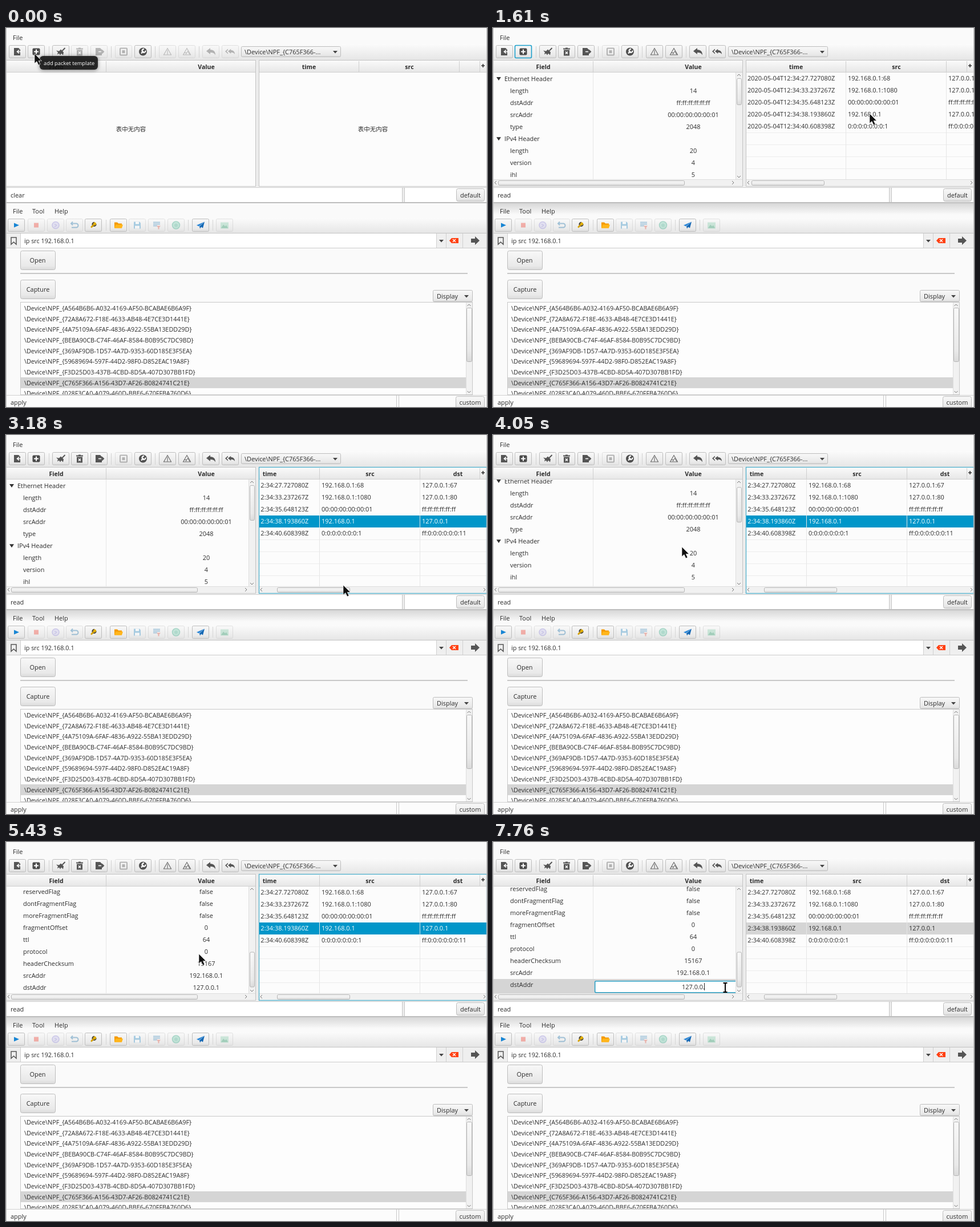
An HTML page for the animation above (8000 ms loop, 843 by 664 pixels).

```html
<!DOCTYPE html>
<html lang="en">
<head>
<meta charset="utf-8">
<title>Packet editor</title>
<style>
html, body { margin: 0; width: 100%; height: 100%; overflow: hidden; background: #fafafa; }
svg { display: block; width: 843px; height: 664px; }
text { font: 10.95px "Open Sans", "Noto Sans CJK SC", "Noto Sans CJK", sans-serif; fill: #2c2c2c; white-space: pre; }
.b { font-weight: 700; font-size: 10.6px; }
.m { text-anchor: middle; }
.dev, .edit { font-size: 10.82px; }
.empty { font-size: 10.5px; }
.btn { fill: url(#btn); stroke: #bdbdbd; }
.off { opacity: .4; }
.thumb { fill: url(#btn); stroke: #b4b4b4; }
.arrow { fill: none; stroke: #777; }
.focus { fill: none; stroke: #4fb0cc; stroke-width: 1.3; }
.ico { fill: #555; }
.line { fill: none; stroke: #fff; stroke-width: 1.6; }
</style>
</head>
<body>
<svg id="stage" viewBox="0 0 843 664"></svg>
<script>
const LOOP = 8000, ROW = 21.05;
const BLUE = '#0096c9', GREY = '#d5d5d5';

const rect = (x, y, w, h, fill, more = '') =>
  `<rect x="${x}" y="${y}" width="${w}" height="${h}" fill="${fill}" ${more}/>`;
const box = (x, y, w, h, cls, more = '') =>
  `<rect x="${x + .5}" y="${y + .5}" width="${w - 1}" height="${h - 1}" class="${cls}" ${more}/>`;
const text = (x, y, s, cls = '', more = '') =>
  `<text x="${x}" y="${y + 4}" class="${cls}" ${more}>${s}</text>`;
const path = (d, more = '') => `<path d="${d}" ${more}/>`;
const hline = (x, y, w, c) => rect(x, y, w, 1, c);
const vline = (x, y, h, c, more) => rect(x, y, 1, h, c, more);
const group = (id, body, more = '') => `<g id="${id}" ${more}>${body}</g>`;
const clip = (id, x, y, w, h) =>
  `<clipPath id="${id}">${rect(x, y, w, h, '#000')}</clipPath>`;
const grad = (id, ...stops) => `<linearGradient id="${id}" x2="0" y2="1">` +
  stops.map(([at, c, a = 1]) => `<stop offset="${at}" stop-color="${c}" stop-opacity="${a}"/>`).join('') + '</linearGradient>';
const drop = (x, y) => path(`M${x - 4} ${y - 2}h8l-4 4.5z`, 'fill="#444"');
const chevron = (x, y, dir) => path({
  l: `M${x + 2} ${y - 3}l-3 3l3 3`, r: `M${x - 2} ${y - 3}l3 3l-3 3`,
  u: `M${x - 3} ${y + 2}l3-3l3 3`, d: `M${x - 3} ${y - 2}l3 3l3-3`
}[dir], 'class="arrow"');
const tool = (x, y, icon, cls = '') =>
  `<g class="${cls}">${box(x, y, 30, 23, 'btn', 'rx="2"')}` +
  `<g class="ico" transform="translate(${x + 15} ${y + 11.5})">${icon}</g></g>`;

const wrench = c => path('M-3 3L1-1M4.5-2A3 3 0 1 1 2-4.5', `fill="none" stroke="${c}" stroke-width="2.2"`);
const sheet = path('M-6-6.5H2L5-3.5V6.5H-6Z');
const reply = 'M-8-1L-1-6.5V-3.5C5-3.5 8 0 8 6C6 2.5 4 1.5-1 1.5V4.5Z';
const prism = path('M0-6L6.500 5.500H-6.500Z', 'fill="none" stroke="#666" stroke-width="1.1"');
const icons = {
  load: sheet + path('M7 0H0M3-3L-.5 0L3 3', 'class="line"'),
  add: rect(-6.5, -6, 13, 12, '#4a4a4a', 'rx="2"') + path('M-4 0H4M0-4V4', 'class="line" style="stroke-width:2"'),
  broom: path('M7.5-6.5L1 0', 'stroke="#555" stroke-width="2"') +
    path('M-8-2L-3-1L0-4L5 1L4 6L1 3L-1 6L-3 3L-6 5L-5 1Z'),
  trash: path('M-6-6H-2V-7H2V-6H6V-4H-6ZM-5-3H5V7H-5Z') + path('M-2 0L2 4M2 0L-2 4', 'class="line"'),
  send: sheet + path('M-1 0H8M5-3L8 0L5 3', 'fill="none" stroke="#555" stroke-width="2"') + path('M-1 0H4', 'class="line"'),
  stop: rect(-6, -6, 12, 12, 'none', 'rx="1" stroke="#555" stroke-width="2"') + rect(-2.5, -2.5, 5, 5, '#555'),
  fix: '<circle r="7" fill="#505050"/>' + wrench('#fff'),
  tri: prism + path('M0-3V5', 'stroke="#666" stroke-width="1.1"'),
  tris: prism + path('M-2 5L1.5-1L5 5M-4 2H0', 'fill="none" stroke="#666"'),
  undo: path(reply),
  undoAll: path(reply, 'transform="translate(2 0) scale(.75)"') + path('M-4-5L-9-.5L-4 4V2L-6.5-.5L-4-3Z')
};

// Seconds, source and destination of each captured packet
const packets = [
  ['27.727080', '192.168.0.1:68', '127.0.0.1:67'],
  ['33.237267', '192.168.0.1:1080', '127.0.0.1:80'],
  ['35.648123', '00:00:00:00:00:01', 'ff:ff:ff:ff:ff:ff'],
  ['38.193860', '192.168.0.1', '127.0.0.1'],
  ['40.608398', '0:0:0:0:0:0:0:1', 'ff:0:0:0:0:0:0:11']
];
const fields = `Ethernet Header
length=14
dstAddr=ff:ff:ff:ff:ff:ff
srcAddr=00:00:00:00:00:01
type=2048
IPv4 Header
length=20
version=4
ihl=5
tos=0
totalLength=20
identification=0
reservedFlag=false
dontFragmentFlag=false
moreFragmentFlag=false
fragmentOffset=0
ttl=64
protocol=0
headerChecksum=15167
srcAddr=192.168.0.1
dstAddr=127.0.0.1`.split('\n').map(s => s.split('='));
const devices = `A564B6B6-A032-4169-AF50-BCABAE6B6A9F
72A8A672-F18E-4633-AB48-4E7CE3D1441E
4A75109A-6FAF-4836-A922-55BA13EDD29D
BEBA90CB-C74F-46AF-8584-B0B95C7DC9BD
369AF9DB-1D57-4A7D-9353-60D185E3F5EA
59689694-597F-44D2-98F0-D852EAC19A8F
F3D25D03-437B-4CBD-8D5A-407D307BB1FD
C765F366-A156-43D7-AF26-B0824741C21E
028F3CA0-A079-460D-BBE6-670FFBA760D6`.split('\n');

const defs = '<defs>' +
  grad('btn', [0, '#f8f8f8'], [.8, '#e9e9e9'], [1, '#dadada']) +
  grad('bar', [0, '#fbfbfb'], [1, '#e6e6e6']) + grad('head', [0, '#fafafa'], [1, '#e6e6e6']) +
  grad('fade', [0, '#000', .14], [1, '#000', 0]) +
  clip('treeClip', 1, 78, 424, 187) + clip('listClip', 443, 57, 399, 208) +
  clip('headClip', 443, 57, 387, 21) + clip('devClip', 25, 480, 781, 162) + '</defs>';

const treeRow = ([name, value], i) => {
  const y = 88.9 + i * ROW, last = i === fields.length - 1;
  if (value === undefined) return path(`M6 ${y - 3}h8l-4 6z`, 'fill="#333"') + text(20, y, name);
  return text(30, y, name, '', last ? 'id="lastName"' : '') +
    text(351, y, value, 'm', last ? 'id="lastValue"' : '');
};

const topWindow = () =>
  rect(0, 0, 843, 306, '#fafafa') + text(12, 17.4, 'File') +
  rect(0, 28, 843, 28, 'url(#bar)') +
  [75, 184, 261, 338].map(x => vline(x, 32, 20, '#d2d2d2')).join('') +
  tool(5, 30, icons.load) + tool(38, 30, icons.add) + tool(81, 30, icons.broom) +
  tool(114, 30, icons.trash, 'late') + tool(148, 30, icons.send, 'late') +
  tool(191, 30, icons.stop, 'off') + tool(225, 30, icons.fix) +
  tool(268, 30, icons.tri, 'late') + tool(302, 30, icons.tris, 'late') +
  tool(344, 30, icons.undo, 'late') + tool(378, 30, icons.undoAll, 'late') +
  box(38, 30, 30, 23, 'focus', 'id="addFocus" rx="2" style="stroke:#1b9fcb;stroke-width:1.6"') +
  box(412, 32, 175, 19, 'btn', 'rx="2"') + text(418, 42, '\\Device\\NPF_{C765F366-...') + drop(577, 42) +
  // left table
  rect(0, 56, 438, 222, '#fcfcfc') + rect(0, 57, 438, 21, 'url(#head)') + hline(0, 77, 438, '#cfcfcf') +
  vline(175, 58, 19, '#cfcfcf') + text(88, 68, 'Field', 'b m') + text(351, 68, 'Value', 'b m') +
  text(219, 177.2, '表中无内容', 'm empty') +
  group('tree', vline(175, 78, 187, '#e6e6e6') +
    `<g clip-path="url(#treeClip)">${rect(1, 245, 424, 20, BLUE, 'id="pick"')}` +
    group('rows', fields.map(treeRow).join('')) +
    group('edit', rect(178.7, 243.7, 260, 20, '#fff', 'stroke="#2b9fc4" stroke-width="1.6" rx="2"') +
      text(351, 253.5, '', 'm', 'id="typed"') + vline(374, 247, 13, '#222', 'id="caret"')) + '</g>' +
    rect(425, 78, 12, 187, '#f1f1f1') + vline(425, 78, 187, '#dedede') + chevron(431, 82, 'u') + chevron(431, 261, 'd') +
    '<rect id="vThumb" class="thumb" x="427.5" width="8" rx="2"/>' +
    rect(1, 265, 436, 12, '#f1f1f1') + hline(1, 265, 436, '#dedede') +
    chevron(4, 271, 'l') + chevron(421, 271, 'r') + box(9, 267, 327, 9, 'thumb', 'rx="2"')) +
  box(0, 56, 438, 222, '', 'fill="none" stroke="#c4c4c4"') + box(0, 56, 438, 222, 'focus', 'id="treeFocus"') +
  rect(438, 56, 5, 222, '#ececec') +
  // right table
  rect(443, 56, 400, 222, '#fcfcfc') + rect(443, 57, 399, 21, 'url(#head)') + hline(443, 77, 399, '#cfcfcf') +
  text(643, 177.2, '表中无内容', 'm empty') +
  group('list', [5, 6, 7, 8].map(i => hline(443, Math.round(78 + i * ROW), 399, '#ececec')).join('') +
    rect(443, 141, 399, 21, BLUE, 'id="pickRow"') +
    `<g clip-path="url(#listClip)">` + group('cells',
      [618, 794].map(x => vline(x, 78, 187, '#e6e6e6')).join('') +
      packets.map(([t, src, dst], i) => group('p' + i, [`2020-05-04T12:34:${t}Z`, src, dst]
        .map((s, c) => text(446 + c * 176, 88 + i * ROW, s, '', 'style="fill:inherit"')).join(''), 'fill="#2c2c2c"')).join('')) + '</g>' +
    rect(443, 265, 399, 12, '#f1f1f1') + hline(443, 265, 399, '#dedede') +
    chevron(447, 271, 'l') + chevron(839, 271, 'r') + box(453, 267, 128, 9, 'thumb', 'id="hThumb" rx="2"')) +
  `<g clip-path="url(#headClip)">` + group('heads',
    [618, 794].map(x => vline(x, 58, 19, '#cfcfcf')).join('') +
    text(531, 68, 'time', 'b m') + text(707, 68, 'src', 'b m') + text(861, 68, 'dst', 'b m')) + '</g>' +
  vline(830, 58, 19, '#cfcfcf') + path('M833 66h6M836 63v6', 'stroke="#333" stroke-width="1.6"') +
  box(443, 56, 400, 222, '', 'fill="none" stroke="#c4c4c4"') + box(443, 56, 400, 222, 'focus', 'id="listFocus"') +
  // status
  hline(0, 279, 843, '#c8c8c8') + rect(0, 280, 843, 25, '#fff') + text(8, 293, '', '', 'id="status"') +
  rect(694, 280, 5, 25, '#ececec') + vline(694, 280, 25, '#c8c8c8') + vline(698, 280, 25, '#c8c8c8') +
  box(789, 281, 50, 23, 'btn', 'rx="3"') + text(814, 293, 'default', 'm') +
  rect(0, 305, 843, 2, '#bdbdbd');

const bottomWindow = () =>
  rect(0, 307, 843, 357, '#fafafa') + rect(0, 307, 843, 20, 'url(#fade)', 'id="shade"') +
  text(12, 321.4, 'File') + text(46, 321.4, 'Tool') + text(85, 321.4, 'Help') +
  rect(0, 333, 843, 26, 'url(#bar)') + hline(0, 359, 843, '#c4c4c4') +
  [175, 319, 362].map(x => vline(x, 336, 19, '#d6d6d6')).join('') +
  tool(3, 334, path('M-4-4L5 0L-4 4Z', 'fill="#1785d4"')) +
  tool(38, 334, rect(-4, -4, 8, 8, '#f04a3c'), 'off') +
  tool(72, 334, '<circle r="6" fill="#c9c5ee" stroke="#8f86d8" stroke-width="1.5"/>' + path('M-2-2L2 0L-2 3', 'fill="none" stroke="#7468cc"'), 'off') +
  tool(105, 334, path('M-6-3H3A3.5 3.5 0 0 1 3 4H-5M-3-6L-6-3L-3 0', 'fill="none" stroke="#2878ac" stroke-width="2"'), 'off') +
  tool(138, 334, wrench('#4a4436') + path('M-4 4L1-1', 'stroke="#d8a300" stroke-width="2.5"') + '<circle cx="2.5" cy="-2.5" r="2.5" fill="#e0ad00"/>') +
  tool(182, 334, path('M-7-5H-2L0-3H6V5H-7Z', 'fill="#f59a00"') + path('M-5-1H8L6 5H-7Z', 'fill="#ffb61c"')) +
  tool(215, 334, path('M-6-6H4L6-4V6H-6Z', 'fill="#3993c9"') + rect(-3, -6, 6, 4, '#fff') + rect(-4, 1, 8, 5, '#fff'), 'off') +
  tool(249, 334, path('M-6-5H6M-6-2H6M-6 1H1', 'stroke="#418bbe" stroke-width="2"') + path('M0 1H7L4.5 4V7H2.5V4Z', 'fill="#e45c4a"'), 'off') +
  tool(283, 334, '<circle r="6.5" fill="#7ed0b4" stroke="#35a886" stroke-width="1.5"/><circle r="3" fill="#4fb797"/>', 'off') +
  tool(326, 334, path('M7-6L-7 0L-3 2Z', 'fill="#2b87d8"') + path('M7-6L-2 2L-1 6L1 3L4 5Z', 'fill="#1668b4"')) +
  tool(368, 334, rect(-7, -5, 14, 11, '#8fd1b2') + path('M-6 5L-2-1L1 2L3 0L6 5Z', 'fill="#2e9b6b"'), 'off') +
  // filter bar
  rect(0, 360, 843, 25, '#efefef') + rect(25, 360, 729, 25, '#fff') + hline(0, 385, 843, '#cccccc') +
  path('M9 367h9v12l-4.5-4l-4.5 4z', 'fill="none" stroke="#555" stroke-width="1.5"') + text(32, 373, 'ip src 192.168.0.1', 'edit') +
  [25, 754, 771, 800].map(x => vline(x, 360, 25, '#d0d0d0')).join('') + drop(763, 373) +
  path('M777 372.5l4-4.5h12v9h-12z', 'fill="#ff4113"') + path('M783 370l5 5m0-5l-5 5', 'stroke="#fff" stroke-width="1.4"') +
  path('M815 369h7v-4l8 7.5l-8 7.5v-4h-7z', 'fill="#555"') +
  // main panel
  box(25, 390, 62, 34, 'btn', 'rx="3"') + text(55.5, 407, 'Open', 'm') +
  rect(25, 429, 784, 2, '#c8c8c8') +
  box(25, 441, 62, 34, 'btn', 'rx="3"') + text(56, 458, 'Capture', 'm') +
  box(748, 459, 70, 21, 'btn', 'rx="2"') + text(755, 470, 'Display') + drop(807, 470) +
  rect(25, 480, 793, 162, '#fdfdfd') + rect(26, 612, 780, 19, GREY) +
  `<g clip-path="url(#devClip)">${devices.map((d, i) => text(32, 491 + i * 18.65, `\\Device\\NPF_{${d}}`, 'dev')).join('')}</g>` +
  rect(806, 480, 12, 162, '#f1f1f1') + vline(806, 480, 162, '#dedede') +
  chevron(811.5, 485, 'u') + chevron(811.5, 638, 'd') + box(807, 490, 10, 95, 'thumb', 'rx="2"') +
  box(25, 480, 793, 163, '', 'fill="none" stroke="#c8c8c8"') +
  rect(0, 643, 843, 21, '#fcfcfc') + hline(0, 643, 843, '#d0d0d0') + text(8, 656, 'apply') +
  vline(684, 643, 21, '#c8c8c8') + vline(688, 643, 21, '#c8c8c8') +
  box(788, 645, 51, 24, 'btn', 'rx="3"') + text(813.5, 656, 'custom', 'm') +
  vline(0, 0, 664, '#c4c4c4') + vline(842, 0, 664, '#c4c4c4');

const overlay = () =>
  group('tip', rect(59, 49, 102, 24, '#161616', 'rx="6" fill-opacity=".88" style="filter:drop-shadow(0 1px 3px #0008)"') +
    text(66, 61, 'add packet template', '', 'style="font-size:9.35px;fill:#fff"')) +
  group('mouse', path('M0 0V17L4 13.5L7 20L10 18.5L7.2 12.5H12.5Z', 'id="pointer" stroke="#fff" stroke-width=".6"') +
    path('M-3.5-8H-1L0-7L1-8H3.5M0-7V7M-3.5 8H-1L0 7L1 8H3.5', 'id="beam" fill="none" stroke="#000" stroke-width="2"'));

document.getElementById('stage').innerHTML = defs + topWindow() + bottomWindow() + overlay();

const $ = id => document.getElementById(id);
const show = (id, on) => { $(id).style.display = on ? '' : 'none'; };
const set = (id, name, v) => $(id).setAttribute(name, v);
const shift = (id, x, y) => set(id, 'transform', `translate(${x} ${y})`);

// [time, values...], each held until the next
const mousePath = [
  [0, 50, 45], [620, 165, 58], [740, 300, 74], [860, 431, 88], [980, 446, 95],
  [1130, 484, 106], [1250, 524, 117], [1370, 570, 129], [1490, 620, 140], [1610, 660, 150], [1730, 684, 155],
  [1880, 668, 190], [2000, 633, 240], [2150, 598, 266], [2300, 580, 268], [2420, 568, 267],
  [2790, 573, 266], [2940, 580, 265], [3060, 587, 264], [3180, 591, 263],
  [3420, 630, 228], [3540, 664, 190], [3680, 500, 177], [3800, 331, 196], [4660, 338, 196],
  [5570, 352, 206], [5700, 371, 221], [5840, 370, 243], [5990, 370, 248],
  [6480, 375, 255], [6870, 384, 255], [6990, 395, 255], [7110, 402, 255], [7230, 407, 255]
];
const treeScroll = [[0, 0], [4050, 8], [4170, 17], [4290, 25], [4910, 50], [5190, 110], [5310, 190], [5430, 255], [6480, 259.7]];
const listScroll = [[0, 0], [2790, 15], [2940, 36], [3060, 57], [3180, 69]];
const at = (keys, t) => keys.filter(k => k[0] <= t).pop().slice(1);

function render(t) {
  const loaded = t >= 500, chosen = t >= 1730, picked = t >= 5990, editing = t >= 6480;
  const [mx, my] = at(mousePath, t), [ty] = at(treeScroll, t), [lx] = at(listScroll, t);

  show('tip', !loaded);
  show('tree', loaded);
  show('list', loaded);
  show('shade', loaded);
  document.querySelectorAll('.empty').forEach(e => { e.style.display = loaded ? 'none' : ''; });
  document.querySelectorAll('.late').forEach(e => e.classList.toggle('off', !loaded));
  $('status').textContent = loaded ? 'read' : 'clear';
  show('addFocus', loaded && !chosen);

  show('listFocus', chosen && !picked);
  show('pickRow', chosen);
  set('pickRow', 'fill', picked ? GREY : BLUE);
  set('p3', 'fill', chosen && !picked ? '#fff' : '#2c2c2c');
  shift('cells', -lx, 0);
  shift('heads', -lx, 0);
  shift('hThumb', lx * 22 / 69, 0);

  shift('rows', 0, -ty);
  set('vThumb', 'y', 88.5 + Math.min(ty, 255) * 104.5 / 255);
  set('vThumb', 'height', chosen ? 61 : 46);
  show('treeFocus', picked && !editing);
  show('pick', picked);
  set('pick', 'fill', editing ? GREY : BLUE);
  set('pick', 'y', editing ? 240 : 244);
  set('pick', 'height', editing ? 25 : 21);
  $('lastName').style.fill = $('lastValue').style.fill = picked && !editing ? '#fff' : '';
  show('lastValue', !editing);

  const erased = t >= 7760;
  show('edit', editing);
  $('typed').textContent = erased ? '127.0.0.' : '127.0.0.1';
  set('caret', 'x', erased ? 370 : 374);
  show('caret', t < 7110 || t >= 7480);

  shift('mouse', mx, my);
  show('pointer', !editing);
  show('beam', editing);
  set('pointer', 'fill', picked ? '#e8502a' : '#111');
  set('pointer', 'stroke', picked ? '#333' : '#fff');
}

const start = performance.now();
(function frame() {
  render((performance.now() - start) % LOOP);
  requestAnimationFrame(frame);
})();
</script>
</body>
</html>
```
